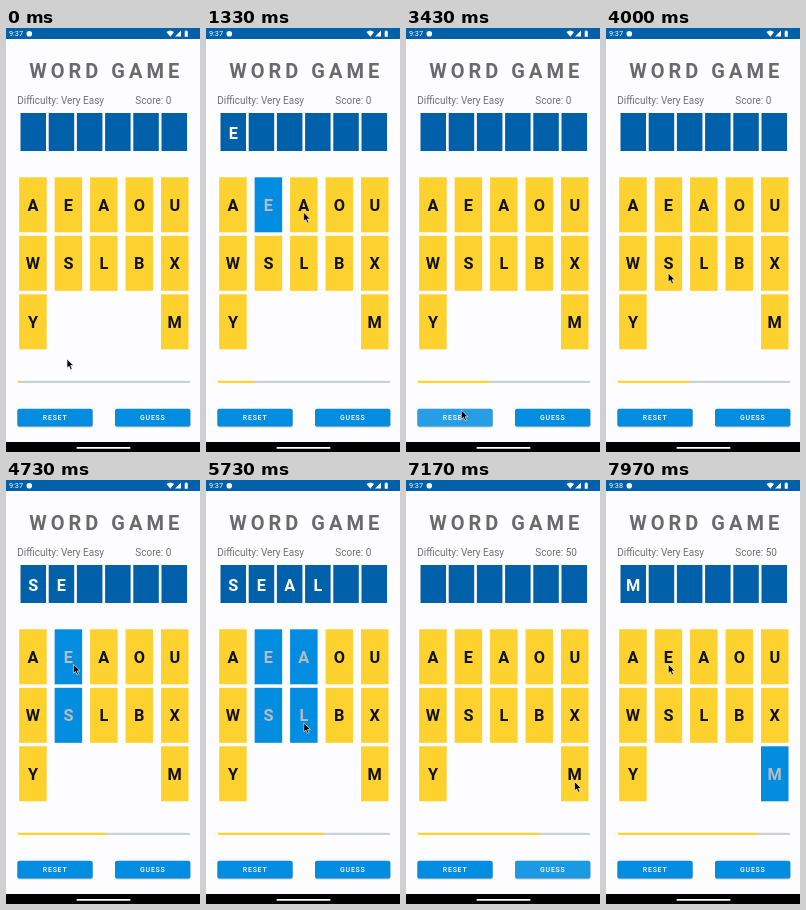
Animation, 194 px wide and 424 px high, one loop 8000 ms. Source, as an HTML page:

```html
<!DOCTYPE html>
<html lang="en">
<head>
<meta charset="utf-8">
<title>Word game</title>
<style>
  html, body { margin: 0; width: 100%; height: 100%; overflow: hidden; background: #fdfcff; }
  svg { display: block; width: 100vw; height: 100vh; font-family: Roboto, sans-serif; }
  .label { font-size: 10px; fill: #707070; }
  .title { font-size: 20px; font-weight: 700; letter-spacing: 4px; fill: #6a6a6a; }
  .letter { font-size: 16.3px; font-weight: 700; text-anchor: middle; fill: #111; }
  .key rect { fill: #fdd12e; }
  .key.used rect { fill: #028de0; }
  .key.used text { fill: #b5bcc2; }
  .slot rect { fill: #0060a9; }
  .slot text { fill: #fff; }
  .button text { font-size: 7px; font-weight: 500; letter-spacing: .75px; text-anchor: middle; fill: #fff; }
</style>
</head>
<body>
<svg viewBox="0 0 194 424" preserveAspectRatio="none">
  <rect width="194" height="424" fill="#fdfcff"/>
  <rect width="194" height="11" fill="#0060a9"/>
  <g fill="#fff">
    <text id="clock" x="3" y="8" font-size="7.3">9:37</text>
    <circle cx="23.3" cy="5.7" r="2.8"/>
    <path d="M160.5 4Q164.3 1 168 4L164.3 8.7ZM175 2.5V8.6H169ZM178.7 3.3H179.5V2.5H181V3.3H181.8V8.7H178.7Z"/>
  </g>
  <text class="title" x="23.3" y="49.8">WORD GAME</text>
  <text class="label" x="11.3" y="75.5">Difficulty: Very Easy</text>
  <text class="label" id="score" x="129.3" y="75.5">Score: 0</text>
  <g id="board"></g>
  <rect x="12" y="352.8" width="172" height="2.2" fill="#c9d2d0"/>
  <rect id="progress" x="12" y="352.8" height="2.2" fill="#fdd728"/>
  <rect y="414" width="194" height="10" fill="#000"/>
  <rect x="70.5" y="419" width="54" height="1.8" rx=".9" fill="#fff"/>
  <path id="cursor" d="M0 0V9L2.1 7.2L3.6 10.6L5.2 9.9L3.7 6.6H6.6Z" fill="#000" stroke="#fff" stroke-width=".6"/>
</svg>
<script>
const LOOP = 8000;
const $ = id => document.getElementById(id);

function add(parent, tag, attrs, text = '') {
  const node = document.createElementNS('http://www.w3.org/2000/svg', tag);
  for (const name in attrs) node.setAttribute(name, attrs[name]);
  node.textContent = text;
  return parent.appendChild(node);
}

function tile(kind, x, y, width, height, baseline, letter = '') {
  const group = add($('board'), 'g', { class: kind });
  add(group, 'rect', { x, y, width, height });
  add(group, 'text', { class: 'letter', x: x + width / 2, y: y + baseline }, letter);
  return group;
}

function button(label, x) {
  const group = add($('board'), 'g', { class: 'button' });
  const box = { x, y: 380.7, width: 75.3, height: 17.8, rx: 2 };
  add(group, 'rect', { ...box, x: x + .4, y: 381.6, fill: '#000', opacity: .2 });
  add(group, 'rect', { ...box, fill: '#028de0' });
  const glow = add(group, 'rect', { ...box, fill: '#fff', opacity: 0 });
  add(group, 'text', { x: x + 37.8, y: 392.3 }, label);
  return { glow, aim: [x + 44, 383] };
}

const slots = Array.from({ length: 6 }, (_, i) => tile('slot', 14.5 + i * 28.2, 85, 25.5, 38, 25.5));

// The second A takes over the name, as it is the one that gets tapped.
const keys = [], targets = {};
['AEAOU', 'WSLBX', 'Y   M'].forEach((row, r) => [...row].forEach((letter, c) => {
  if (letter === ' ') return;
  const x = 13.2 + c * 35.45, y = 149.3 + r * 58.5;
  const key = { node: tile('key', x, y, 27.5, 55, 33.6, letter), aim: [x + 13.7, y + 35] };
  keys.push(key);
  targets[letter] = key;
}));
targets.reset = button('RESET', 11.3);
targets.guess = button('GUESS', 109);

const rounds = [
  { word: 'EAO', start: 1080, step: 360, end: 'reset', endTime: 3300 },
  { word: 'SEAL', start: 4150, step: 470, end: 'guess', endTime: 6650 },
  { word: 'ME', start: 7290, step: 770 }
];

const taps = rounds.flatMap(({ word, start, step, end, endTime }) => [
  ...[...word].map((letter, i) => ({ time: start + i * step, target: targets[letter], letter })),
  ...(end ? [{ time: endTime, target: targets[end] }] : [])
]);

// The pointer reaches each target shortly before tapping it.
function pointerAt(t) {
  const next = taps.findIndex(tap => tap.time > t);
  const previous = taps[next - 1] || { time: 0, target: { aim: [61, 331] } };
  const arrive = taps[next].time - 100;
  const depart = Math.max(previous.time + 30, arrive - 650);
  const u = Math.min(1, Math.max(0, (t - depart) / (arrive - depart)));
  const eased = u * u * (3 - 2 * u);
  return previous.target.aim.map((from, i) => from + (taps[next].target.aim[i] - from) * eased);
}

function enteredAt(t) {
  const done = taps.filter(tap => tap.time <= t);
  return done.slice(done.findLastIndex(tap => !tap.letter) + 1);
}

function glowAt(age) {
  return .14 * Math.max(0, Math.min(1, age / 80, (700 - age) / 250));
}

function draw(t) {
  const entered = enteredAt(t);
  slots.forEach((slot, i) => slot.lastChild.textContent = entered[i]?.letter ?? '');
  keys.forEach(key => key.node.classList.toggle('used', entered.some(tap => tap.target === key)));

  for (const { end, endTime } of rounds) {
    if (end) targets[end].glow.setAttribute('opacity', glowAt(t - endTime));
  }
  const percent = 1 + 10 * Math.floor((t + 750) / 1000);
  $('progress').setAttribute('width', 1.72 * percent);
  $('score').textContent = t < rounds[1].endTime ? 'Score: 0' : 'Score: 50';
  $('clock').textContent = t < 7600 ? '9:37' : '9:38';
  $('cursor').setAttribute('transform', `translate(${pointerAt(t)})`);
}

const start = performance.now();
function frame() {
  draw((performance.now() - start) % LOOP);
  requestAnimationFrame(frame);
}
frame();
</script>
</body>
</html>
```
